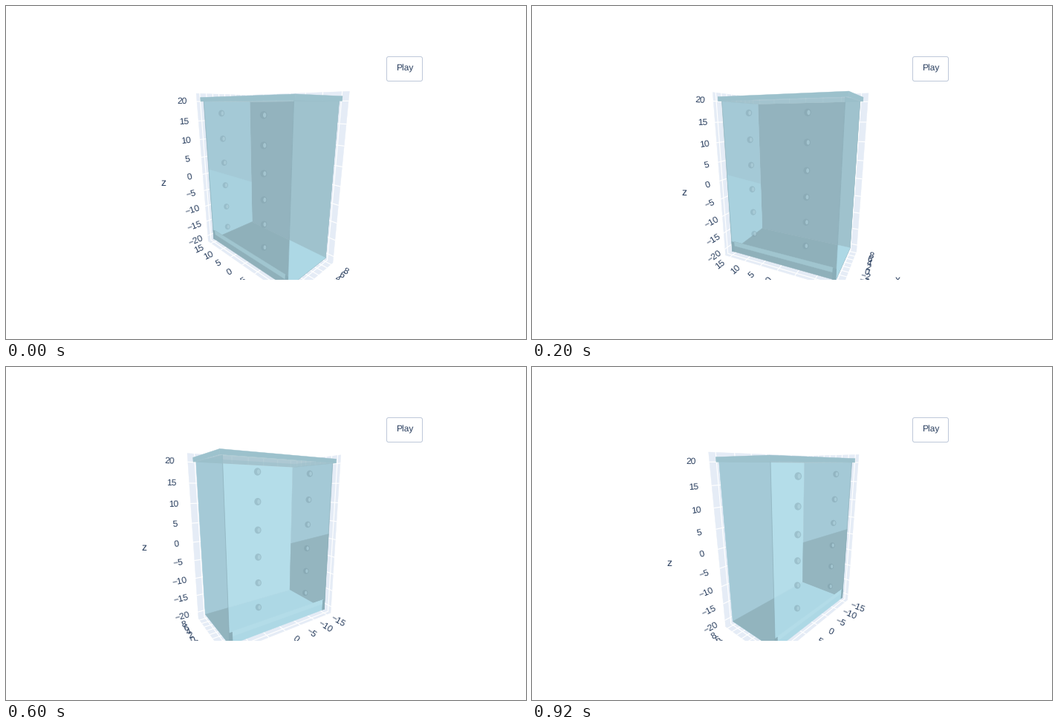
Recreate the animation shown at these times as a matplotlib script. Size 700x450 px, loop 1000 ms.

```python
import numpy as np
import matplotlib.pyplot as plt
from matplotlib.animation import FuncAnimation
from matplotlib.patches import Ellipse, FancyBboxPatch, Polygon, Rectangle

W, H, DPI = 700, 450, 100
PX = 72 / DPI
INK, WALL, SKY, MIST, TEAL, SLATE = (
    "#2a3f5f", "#e5ecf6", "#add8e5", "#a8d1de", "#a4c9d6", "#93b3be")

# Camera azimuth and elevation in degrees; positive azimuth shows the right side.
VIEWS = ((45, 17.4), (25, 14.7), (7, 33.8), (-33, 12.7), (-49, 17.5))
DISTANCE, CENTER, VIEW_HEIGHT = 64.5, (350, 235), 270
FOCAL = VIEW_HEIGHT / 2 / np.tan(np.radians(22.5))

# Half sizes of the cabinet and of the axes box, in data units.
DEPTH, WIDTH, TOP, BOTTOM = 8, 15, 20, -20.8
BOX = np.array([9, 16.7, 22])
TICKS = (range(-8, 9, 2), range(-15, 16, 5), range(-20, 21, 5))

RIGHT_LIT = dict(back=SLATE, sheen=MIST, near="#9fc2cd", floor="#8fb0ba",
                 through=SKY, band="#a0c5cf", shade="#7f9fac", glint="#b4d6e0")
LEFT_LIT = dict(back="#b4dde9", sheen="#94b5bf", near=TEAL, floor=SKY,
                through="#92b4be", band="#b3dce8", shade="#7899a5",
                glint="#b4d9e4")

plt.rcParams["font.family"] = "Liberation Sans"
plt.rcParams["text.hinting"] = "none"
fig = plt.figure(figsize=(W / DPI, H / DPI), dpi=DPI, facecolor="white")
ax = fig.add_axes([0, 0, 1, 1])


def rect(axis, value, first, second):
    """Corners of a rectangle lying across one axis."""
    (a, b), (c, d) = first, second
    corners = np.array([(a, c), (b, c), (b, d), (a, d)], float)
    return np.insert(corners, axis, value, axis=1)


def write(label, x, y, turn=0, size=12, va="center"):
    ax.text(x, y, label, rotation=turn, size=size * PX, color=INK,
            ha="center", va=va)


class Scene:
    def __init__(self, azimuth, elevation):
        self.elevation = elevation
        a, e = np.radians((azimuth, elevation))
        self.right = np.array([np.sin(a), -np.cos(a), 0])
        self.toward = np.array([-np.cos(a) * np.cos(e),
                                -np.sin(a) * np.cos(e), np.sin(e)])
        self.up = np.cross(self.toward, self.right)
        self.far = 1 if azimuth > 0 else -1
        self.colors = RIGHT_LIT if azimuth > 0 else LEFT_LIT

    def scale(self, points):
        return FOCAL / (DISTANCE - points @ self.toward)

    def project(self, points):
        points = np.asarray(points, float)
        flat = np.stack([points @ self.right, -(points @ self.up)], axis=-1)
        return CENTER + flat * self.scale(points)[..., None]

    def face(self, color, points, alpha=1, clip=None):
        patch = Polygon(self.project(points), fc=color, alpha=alpha, lw=0.3,
                        ec=color if alpha == 1 else "none")
        ax.add_patch(patch)
        if clip:
            patch.set_clip_path(clip)
        return patch

    def edge(self, color, start, end, width=1, alpha=1):
        x, y = self.project([start, end]).T
        ax.plot(x, y, color=color, lw=width * PX, alpha=alpha, zorder=1)

    def wall(self, axis, value):
        others = [i for i in range(3) if i != axis]
        spans = [(-BOX[i], BOX[i]) for i in others]
        self.face(WALL, rect(axis, value, *spans))
        for run, cross in (others, others[::-1]):
            for tick in TICKS[run]:
                ends = np.zeros((2, 3))
                ends[:, axis], ends[:, run] = value, tick
                ends[:, cross] = -BOX[cross], BOX[cross]
                self.edge("white", *ends, width=1.2)

    def label_axis(self, axis, corner, push):
        """Tick labels and title, set off from a box edge and turned along push."""
        push = np.array(push)
        for tick in TICKS[axis]:
            base = np.array(corner, float)
            base[axis] = tick
            start, (x, y) = self.project([base, base + 4.2 * push])
            dx, dy = (x, y) - start
            turn = (np.degrees(np.arctan2(-dy, dx)) + 80) % 180 - 80
            if y < 376:
                write(str(tick).replace("-", "\u2212"), x, y, turn)
        base[axis] = 0
        x, y = self.project(base + 11.5 * push)
        if y < 376:
            write("xyz"[axis], x, y, size=14)

    def axes(self):
        x, y, z = BOX
        self.wall(0, x)
        self.wall(1, self.far * y)
        self.wall(2, -z)
        side = (0, -self.far, 0)
        self.label_axis(0, (0, -self.far * y, -z), side)
        self.label_axis(1, (-x, 0, -z), (-1, 0, 0))
        self.label_axis(2, (-self.far * x, y, 0),
                        (-1, 0, 0) if self.far > 0 else side)

    def cabinet(self):
        c, far = self.colors, self.far * WIDTH
        depth, width, height = (-DEPTH, DEPTH), (-WIDTH, WIDTH), (BOTTOM, TOP)
        floor = rect(2, BOTTOM, depth, width)
        self.face(c["back"], rect(0, DEPTH, width, height))
        self.face(TEAL, rect(1, far, depth, height))
        self.face(c["sheen"], [(-DEPTH, far, 1.6), (DEPTH, far, -self.elevation / 3),
                               (DEPTH, far, BOTTOM), (-DEPTH, far, BOTTOM)])
        self.face(c["floor"], floor)
        self.face(c["floor"], rect(0, -DEPTH, (-14.2, 14.2), (-20, -17.6)))
        self.face(c["band"], rect(0, -DEPTH, (-14.2, 14.2), (-18.9, -17.6)))
        near = self.face(c["near"], rect(1, -far, depth, height))
        self.face(c["through"], floor, clip=near)
        for side in (-1, 1):
            self.face("#8aadb8", rect(0, -DEPTH, (side * 14.2, side * WIDTH),
                                      (BOTTOM, -17.8)))
            self.edge("#86a8b3", (-DEPTH, side * WIDTH, BOTTOM),
                      (-DEPTH, side * WIDTH, TOP), alpha=0.5)
        self.holes()
        self.lid()

    def holes(self):
        for y in (7.3, -7.3):
            for z in np.linspace(17.2, -13.7, 6):
                spot = np.array([-DEPTH, y, z])
                x, v = self.project(spot)
                size = 1.45 * self.scale(spot)
                ax.add_patch(Ellipse((x, v), size, size * 1.1, alpha=0.4,
                                     fc=self.colors["shade"]))
                ax.add_patch(Ellipse((x + size * 0.15, v), size * 0.45,
                                     size * 0.7, alpha=0.6,
                                     fc=self.colors["glint"]))

    def lid(self):
        depth, width, rim = (-8.5, DEPTH), (-15.7, 15.7), (TOP, TOP + 1)
        near = -self.far * 15.7
        if DISTANCE * self.toward[2] > rim[1]:
            self.face(MIST, rect(2, rim[1], depth, width))
            self.face(SKY, rect(2, rim[1], (-7.5, 7), (-14.5, 14.5)))
        else:
            self.face("#9bbdc8", rect(2, TOP, depth, width), alpha=0.75)
        self.face("#9bc0cb", rect(0, DEPTH, width, rim), alpha=0.5)
        self.face("#9bc0cb", rect(1, -near, depth, rim), alpha=0.5)
        self.face("#9dc2cd", rect(1, near, depth, rim))
        self.face("#9cc1cc", rect(0, -8.5, width, rim))


def button():
    ax.add_patch(FancyBboxPatch((512.5, 68.5), 48, 33, fc="white", ec="#bec8d9",
                                boxstyle="round,pad=0,rounding_size=2.5",
                                lw=PX))
    write("Play", 536.5, 88, va="baseline")


def update(i):
    ax.clear()
    ax.set(xlim=(0, W), ylim=(H, 0))
    ax.axis("off")
    scene = Scene(*VIEWS[i])
    scene.axes()
    scene.cabinet()
    # The scene viewport ends here.
    ax.add_patch(Rectangle((0, 370), W, H - 370, fc="white", ec="none", zorder=9))
    button()
    return []


anim = FuncAnimation(fig, update, frames=len(VIEWS), interval=200,
                     repeat=True, repeat_delay=0, blit=False)
plt.show()
```
